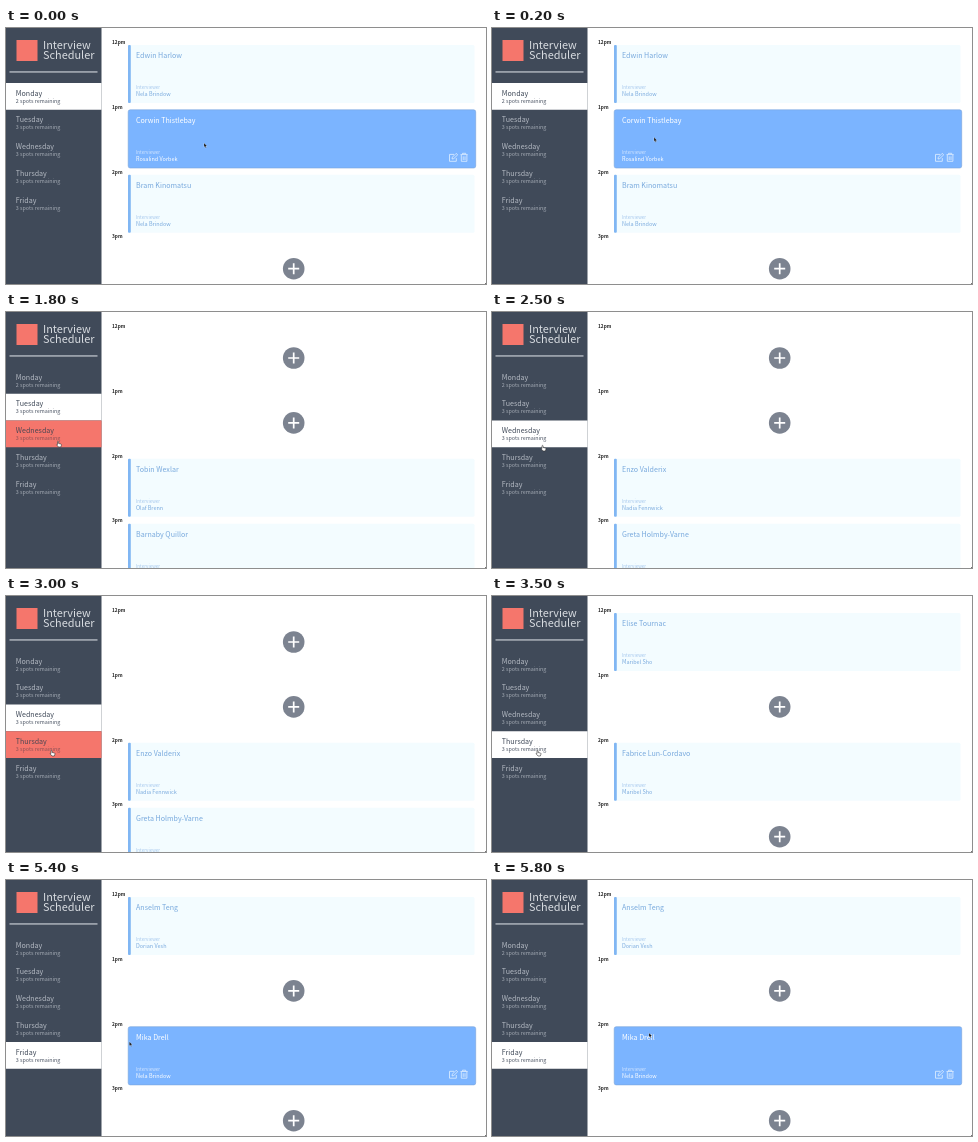
An HTML page that plays this animation: 480x256 px, repeating every 5900 ms.

```html
<!DOCTYPE html>
<html lang="en">
<head>
<meta charset="utf-8">
<title>Interview Scheduler</title>
<style>
  html, body { margin: 0; width: 100%; height: 100%; overflow: hidden; background: #fff; }
  svg { display: block; width: 480px; height: 256px; }
  text { font-family: "Noto Sans CJK JP", "Noto Sans CJK SC", "Noto Sans CJK", "Open Sans", sans-serif; white-space: pre; }
</style>
</head>
<body>
<svg viewBox="0 0 480 256" xmlns="http://www.w3.org/2000/svg">
  <g id="sidebar"></g>
  <g id="schedule"></g>
  <g id="cursor"></g>
</svg>
<script>
const LOOP = 5900, STEP = 100;
const ROW = { top: 55, height: 26.75, width: 95.5 };
const SLOT = { left: 122, top: 17, pitch: 64.9, width: 346.5, height: 58 };
const COLOR = { dark: '#404a59', red: '#f5766c', card: '#f3fcff', edge: '#80b6f3', active: '#7bb4ff', blue: '#78a9dd', grey: '#7c8390' };

const DAYS = ['Monday', 'Tuesday', 'Wednesday', 'Thursday', 'Friday'];
const HOURS = ['12pm', '1pm', '2pm', '3pm'];
const BOOKINGS = [
  [['Edwin Harlow', 'Nela Brindow'], ['Corwin Thistlebay', 'Rosalind Vorbek'], ['Bram Kinomatsu', 'Nela Brindow'], null],
  [null, null, ['Tobin Wexlar', 'Olaf Brenn'], ['Barnaby Quillor', 'Rosalind Vorbek']],
  [null, null, ['Enzo Valderix', 'Nadia Fennwick'], ['Greta Holmby-Varne', 'Olaf Brenn']],
  [['Elise Tournac', 'Maribel Sho'], null, ['Fabrice Lun-Cordavo', 'Maribel Sho'], null],
  [['Anselm Teng', 'Dorian Vesh'], null, ['Mika Drell', 'Nela Brindow'], null]
];

// Times at which the next day is clicked
const CLICKS = [1100, 2500, 3500, 4800];

// Pointer path: time, x, y
const PATH = [
  [0, 198, 115], [600, 90, 98], [900, 69, 99], [1400, 69, 99], [1800, 51, 129],
  [2000, 50, 132], [2200, 49.5, 133], [2700, 49.5, 133], [3000, 44.5, 154],
  [3800, 44.5, 154], [4100, 43, 178], [4200, 43, 178], [4400, 41.5, 178.5],
  [4900, 41.5, 178.5], [5200, 85, 172], [5300, 110, 165], [5600, 150, 155], [5800, 157, 153]
];

const layer = id => document.getElementById(id);
const text = (x, y, size, fill, str, extra = '') =>
  `<text x="${x}" y="${y}" font-size="${size}" fill="${fill}" ${extra}>${str}</text>`;
const rect = (x, y, w, h, fill, extra = '') =>
  `<rect x="${x}" y="${y}" width="${w}" height="${h}" fill="${fill}" ${extra}/>`;

function pointerAt(t) {
  const i = PATH.findIndex(p => p[0] >= t);
  if (i < 0) return PATH[PATH.length - 1].slice(1);
  if (i === 0) return PATH[0].slice(1);
  const [a, b] = [PATH[i - 1], PATH[i]];
  const k = (t - a[0]) / (b[0] - a[0]);
  return [a[1] + (b[1] - a[1]) * k, a[2] + (b[2] - a[2]) * k];
}

function dayRow(name, i, selected, hovered) {
  const y = ROW.top + i * ROW.height;
  const [bg, title, note] =
    i === selected ? ['#fff', COLOR.dark, '#4c5564'] :
    i === hovered ? [COLOR.red, '#4b4753', '#8f5257'] :
    ['none', '#b4bac3', '#a4abb5'];
  return rect(0, y, ROW.width, ROW.height, bg) +
    text(9.8, y + 12.5, 7.1, title, name) +
    text(9.8, y + 19.6, 5.4, note, `${i ? 3 : 2} spots remaining`);
}

function sidebar(selected, hovered) {
  return rect(0, 0, ROW.width, 256, COLOR.dark) +
    rect(10.5, 12, 21, 21, COLOR.red) +
    text(37, 21.3, 10.9, '#d8dce1', 'Interview', 'font-weight="300"') +
    text(37, 31.3, 10.9, '#d8dce1', 'Scheduler', 'font-weight="300"') +
    rect(3.5, 43.4, 88, 1.1, '#d3d8de') +
    DAYS.map((name, i) => dayRow(name, i, selected, hovered)).join('');
}

const addButton = y =>
  `<circle cx="287.7" cy="${y}" r="10.8" fill="${COLOR.grey}"/>
   <path d="M282.2 ${y}h11M287.7 ${y - 5.5}v11" stroke="#fff" stroke-width="1.7"/>`;

const actions = y =>
  `<g transform="translate(443 ${y})" fill="none" stroke="#dcecff" stroke-width=".85" stroke-linejoin="round">
     <path d="M5 1.3H.5V8.2H7.3V5M3 5.9L3.4 4.1L7.2 .3L8.7 1.7L4.8 5.5Z"/>
     <path d="M11.5 1.5H18.7M13.5 1.3V.2H16.7V1.3M12.3 1.8V8.2H17.9V1.8M14.2 3.2V6.9M16 3.2V6.9"/>
   </g>`;

function card([student, interviewer], y, active) {
  const { left, width, height } = SLOT;
  const [name, label] = active ? ['#fff', '#d5e7ff'] : [COLOR.blue, '#a3c6ec'];
  const box = active
    ? rect(left + .2, y - .1, width + 1, height + .2, COLOR.active, 'rx="2" stroke="#79a3da" stroke-width=".6"')
    : rect(left, y, width, height, COLOR.card, 'rx="1.5"') + rect(left, y, 2.8, height, COLOR.edge, 'rx="1"');
  return box +
    text(130, y + 13.4, 7.1, name, student) +
    text(130, y + 44, 4.5, label, 'Interviewer', 'font-weight="300"') +
    text(130, y + 50.9, 5.5, name, interviewer) +
    (active ? actions(y + 43.2) : '');
}

const slotTop = i => SLOT.top + i * SLOT.pitch;

function schedule(day, hovered) {
  return HOURS.map((hour, i) => {
    const y = slotTop(i), booking = BOOKINGS[day][i];
    return text(106, y - 1.3, 4.8, '#222', hour, 'font-weight="700"') +
      (booking ? card(booking, y, i === hovered) : addButton(y + 29));
  }).join('') + rect(479, 255, 1, 1, '#777');
}

function cursor(x, y) {
  const shape = x < ROW.width
    ? '<path d="M.5 .7Q1.2 0 1.6 .8V2.5L4 3Q4.6 3.3 4.4 4.3L3.8 6H1.5L-.4 3.8Q-.4 3.1 .5 3.5Z" fill="#fff" stroke="#333" stroke-width=".6"/>'
    : '<path d="M0 0V4.2L1 3.3L1.7 4.9L2.4 4.6L1.7 3.1H3Z" fill="#111" stroke="#fff" stroke-width=".25"/>';
  return `<g transform="translate(${x} ${y})">${shape}</g>`;
}

function render(t) {
  const [x, y] = pointerAt(t);
  const day = CLICKS.filter(c => t >= c).length;
  const row = x < ROW.width ? Math.floor((y - ROW.top) / ROW.height) : -1;
  const inCards = x >= SLOT.left && x <= SLOT.left + SLOT.width;
  const slot = inCards ? HOURS.findIndex((_, i) => y >= slotTop(i) && y <= slotTop(i) + SLOT.height) : -1;
  layer('sidebar').innerHTML = sidebar(day, row);
  layer('schedule').innerHTML = schedule(day, slot);
  layer('cursor').innerHTML = cursor(x, y);
}

const start = performance.now();
let shown = -1;
function tick() {
  const t = Math.floor(((performance.now() - start) % LOOP) / STEP) * STEP;
  if (t !== shown) render(shown = t);
  requestAnimationFrame(tick);
}
tick();
</script>
</body>
</html>
```
